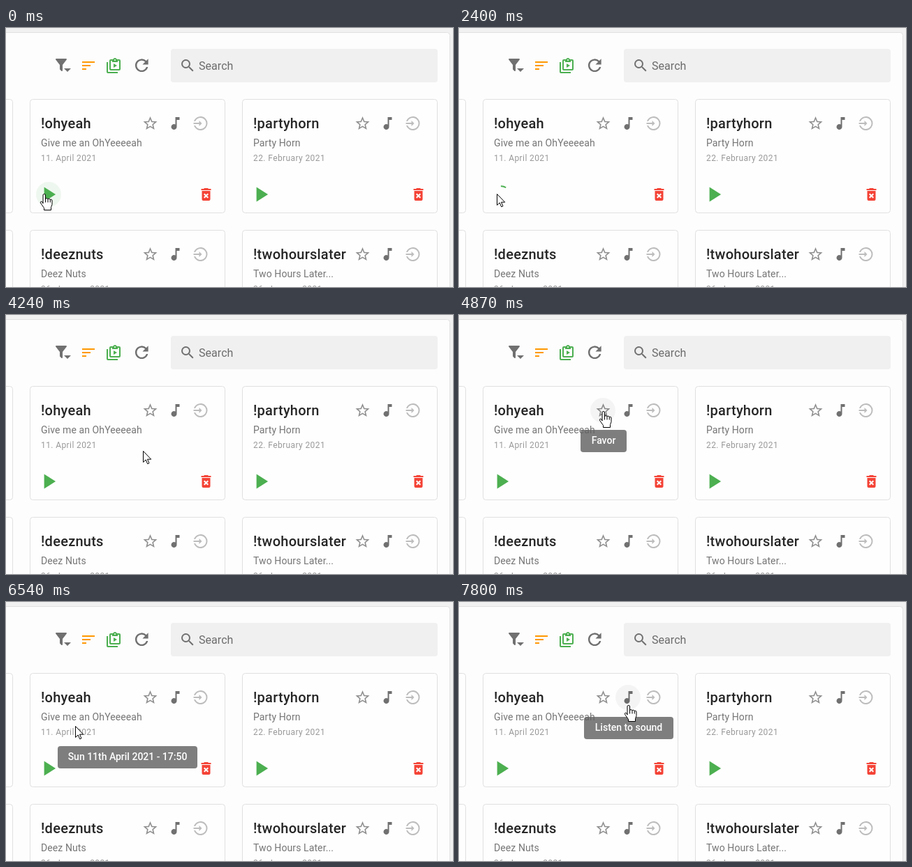
Animation of 640 by 372 pixels, one loop 8 s. Source, as an HTML page:

```html
<!DOCTYPE html>
<html lang="en">
<head>
<meta charset="utf-8">
<title>Sound cards</title>
<style>
  html, body { margin: 0; width: 100%; height: 100%; overflow: hidden; background: #f1f1f1; }
  svg { display: block; width: 100%; height: 100%; }
  text { font: 14px Roboto, sans-serif; letter-spacing: .1px; fill: #757575; }
  .search { font-size: 16px; letter-spacing: .05px; fill: #6c6c6c; }
  .title { font-size: 20px; font-weight: 500; letter-spacing: .25px; fill: #262626; }
  .date { font-size: 12px; letter-spacing: .4px; fill: #999; }
  .tip text { fill: #fff; font-weight: 500; text-anchor: middle; letter-spacing: 0; }
  .line { fill: none; stroke-width: 2; }
  .cursor { fill: #fff; stroke: #000; stroke-linejoin: round; }
</style>
</head>
<body>
<svg viewBox="0 0 640 372">
  <defs>
    <path id="star" fill="#8f8f8f" d="M12 15.39L8.24 17.66L9.23 13.38L5.91 10.5L10.29 10.13L12 6.09L13.71 10.13L18.09 10.5L14.77 13.38L15.76 17.66M22 9.24L14.81 8.63L12 2L9.19 8.63L2 9.24L7.45 13.97L5.82 21L12 17.27L18.18 21L16.54 13.97Z"/>
    <path id="note" fill="#707070" d="M12 3V13.55A4 4 0 1 0 14 17V7H18V3Z"/>
    <path id="enter" fill="#bdbdbd" d="M14 12L10 8V11H2V13H10V16ZM22 12A10 10 0 0 1 2.46 15H4.59A8 8 0 1 0 4.59 9H2.46A10 10 0 0 1 22 12Z"/>
    <path id="play" fill="#4caf50" d="M0 0V21L16.5 10.5Z"/>
    <path id="trash" fill="#f44336" fill-rule="evenodd" d="M6 19A2 2 0 0 0 8 21H16A2 2 0 0 0 18 19V7H6ZM8.46 11.88L9.87 10.47L12 12.59L14.12 10.47L15.53 11.88L13.41 14L15.53 16.12L14.12 17.53L12 15.41L9.88 17.53L8.47 16.12L10.59 14ZM15.5 4L14.5 3H9.5L8.5 4H5V6H19V4Z"/>
  </defs>

  <rect x="-9.5" y="6.5" width="645" height="400" rx="4" fill="#fdfdfd" stroke="#e0e0e0"/>

  <path transform="translate(70 42)" fill="#707070" d="M11 11L16.76 3.62A1 1 0 0 0 16 2H2A1 1 0 0 0 1.21 3.62L7 11V16.87A1 1 0 0 0 7.29 17.7L9.29 19.7A1 1 0 0 0 11 18.87ZM13 16L18 21L23 16Z"/>
  <path class="line" stroke="#ff9800" d="M109 49H127M109 54H121M109 59H115"/>
  <g transform="translate(142 42)" fill="#4caf50" stroke="#4caf50">
    <path class="line" d="M3 7V21Q3 22 4 22H18M8 4H20Q21 4 21 5V17Q21 18 20 18H8Q7 18 7 17V5Q7 4 8 4Z"/>
    <path stroke="none" d="M10 7V3H11.2A3 3 0 0 1 16.8 3H18V7ZM12 9V15L17 12Z"/>
    <circle cx="14" cy="4" r="1" fill="#fdfdfd" stroke="none"/>
  </g>
  <path transform="translate(194.3 53.7) scale(1.167) translate(-12 -12)" fill="#707070" d="M17.65 6.35A8 8 0 1 0 19.73 14H17.65A6 6 0 1 1 16.22 7.78L13 11H20V4Z"/>

  <rect x="236" y="30" width="382" height="48" rx="4" fill="#f0f0f0"/>
  <g transform="translate(248 42)" class="line" stroke="#707070">
    <circle cx="9.5" cy="9.5" r="5.5"/><path d="M14 14L19.8 19.8"/>
  </g>
  <text class="search" x="276" y="60">Search</text>

  <g id="cards"></g>
  <g id="overlay"></g>
</svg>
<script>
const LOOP = 8000;
const $ = id => document.getElementById(id);
const clamp = v => Math.max(0, Math.min(1, v));
const ease = p => p * p * (3 - 2 * p);

const icon = (id, x, y) => `<use class="${id}" href="#${id}" x="${x}" y="${y}"/>`;

// Cards sit on a grid 304 px wide and 188 px high
function card(column, row, title, text, date) {
  return `<g transform="translate(${34 + 304 * column} ${102 + 188 * row})">
    <rect x=".5" y=".5" width="279" height="163" rx="4" fill="#fefefe" stroke="#e0e0e0"/>
    <text class="title" x="16" y="42">${title}</text>
    <text x="16" y="68">${text}</text>
    <text class="date" x="16" y="89">${date}</text>
    ${icon("star", 160.5, 23)}${icon("note", 196.5, 23)}${icon("enter", 232.5, 23)}
    ${icon("play", 20.6, 126.5)}${icon("trash", 240.5, 125)}
  </g>`;
}

$("cards").innerHTML =
  card(0, 0, "!ohyeah", "Give me an OhYeeeeah", "11. April 2021") +
  card(1, 0, "!partyhorn", "Party Horn", "22. February 2021") +
  card(0, 1, "!deeznuts", "Deez Nuts", "26. January 2021") +
  card(1, 1, "!twohourslater", "Two Hours Later...", "26. January 2021") +
  card(-1, 0, "", "", "") + card(-1, 1, "", "", "");

const mainPlay = document.querySelector("#cards .play");
const button = { x: 61, y: 239, tint: "#4caf5016" };
const star = { x: 206, y: 137, tint: "#0000000a" };
const note = { x: 242, y: 137, tint: "#0000000a" };
const RADIUS = 18;

// Each move eases the pointer to a place and rests there until the next one
const moves = [
  { from: 3030, to: 3520, x: 73, y: 239 },
  { from: 3520, to: 4000, x: 230, y: 208 },
  { from: 4000, to: 4240, x: 197, y: 195 },
  { from: 4360, to: 4750, x: 207, y: 138 },
  { from: 5440, to: 5800, x: 165, y: 161 },
  { from: 5940, to: 6300, x: 100, y: 178 },
  { from: 7080, to: 7680, x: 243, y: 148 }
];

function pointerAt(t) {
  let x = 55, y = 238;
  for (const move of moves) {
    const k = ease(clamp((t - move.from) / (move.to - move.from)));
    x += (move.x - x) * k;
    y += (move.y - y) * k;
  }
  return { x: Math.round(x), y: Math.round(y) };
}

const shapes = {
  arrow: `<path d="M-.5 .5V16.5L3.2 13L5.7 18.8L8 17.8L5.5 12.2H10.7Z"/>`,
  hand: `<path d="M-2 14V2Q-2 .5 -.2 .5T1.5 2V8Q1.5 6.6 3.3 6.6T5 8.2Q5.3 7.2 6.7 7.2T8.3 9Q8.6 8.2 9.7 8.2T11 10V15.5L9.5 19.5V23.5H-.5V20.5L-4 15.5L-5.7 12.8Q-5.7 11.2 -4.3 11.2T-2 14Z"/>
    <path fill="none" d="M1.5 8V12.5M5 8.2V12.5M8.3 9V12.5"/>`,
  beam: `<path fill="none" d="M-2.5 -7.5H-.5L.5 -6.5L1.5 -7.5H3.5M.5 -6.5V5.5M-2.5 6.5H-.5L.5 5.5L1.5 6.5H3.5"/>`
};

const overText = ({ x, y }) => x > 50 && x < 196 && y > 157 && y < 173;

const disc = ({ x, y, tint }, r = RADIUS) => `<circle cx="${x}" cy="${y}" r="${r}" fill="${tint}"/>`;

function tooltip(t, label, x, y, width, from, to) {
  const scale = clamp((t - from) / 120), alpha = 1 - clamp((t - to) / 120);
  if (!scale || !alpha) return "";
  return `<g class="tip" opacity="${alpha * scale}" transform="translate(${x} ${y}) scale(${scale})">
    <rect x="${-width / 2}" y="-16" width="${width}" height="32" rx="4" fill="#616161" opacity=".81"/>
    <text y="4">${label}</text></g>`;
}

// The arc grows for half a second, then its tail catches up, while all of it turns
function spinner(age) {
  const cycle = Math.floor(age / 1000), phase = age % 1000 / 500;
  const stretch = 270 * ease(phase % 1), shrinking = phase >= 1;
  const length = shrinking ? 288 - stretch : 18 + stretch;
  const start = 270 * cycle + (shrinking ? stretch : 0) + .18 * age - 146;
  return `<circle class="line" r="10.8" stroke="#4caf50" pathLength="360"
    stroke-dasharray="${length} 360" transform="translate(60.8 238) rotate(${start})"/>`;
}

function draw(t) {
  const loading = t >= 1490 && t < 3020;
  mainPlay.style.display = loading ? "none" : "";

  const pointer = pointerAt(t);
  const targets = loading ? [star, note] : [button, star, note];
  const hovered = targets.find(o => Math.hypot(o.x - pointer.x, o.y - pointer.y) < RADIUS);
  const shape = hovered ? "hand" : overText(pointer) ? "beam" : "arrow";
  const ripple = t >= 1260 && !loading && t < 1490 ? disc(button, RADIUS * clamp((t - 1160) / 200)) : "";

  const date = "Sun 11th April 2021 - 17:50";
  $("overlay").innerHTML = (hovered ? disc(hovered) : "") + ripple +
    (loading ? spinner(t - 1500 + 10) : "") +
    tooltip(t, date, 174, 223, 200, 4363, 4480) +
    tooltip(t, "Favor", 207, 181, 66, 4690, 5683) +
    tooltip(t, date, 174, 223, 200, 6360, 7380) +
    tooltip(t, "Listen to sound", 243, 181, 128, 7610, LOOP) +
    `<g class="cursor" transform="translate(${pointer.x} ${pointer.y})">${shapes[shape]}</g>`;
}

const begin = performance.now();
function tick() {
  draw((performance.now() - begin) % LOOP);
  requestAnimationFrame(tick);
}
tick();
</script>
</body>
</html>
```
